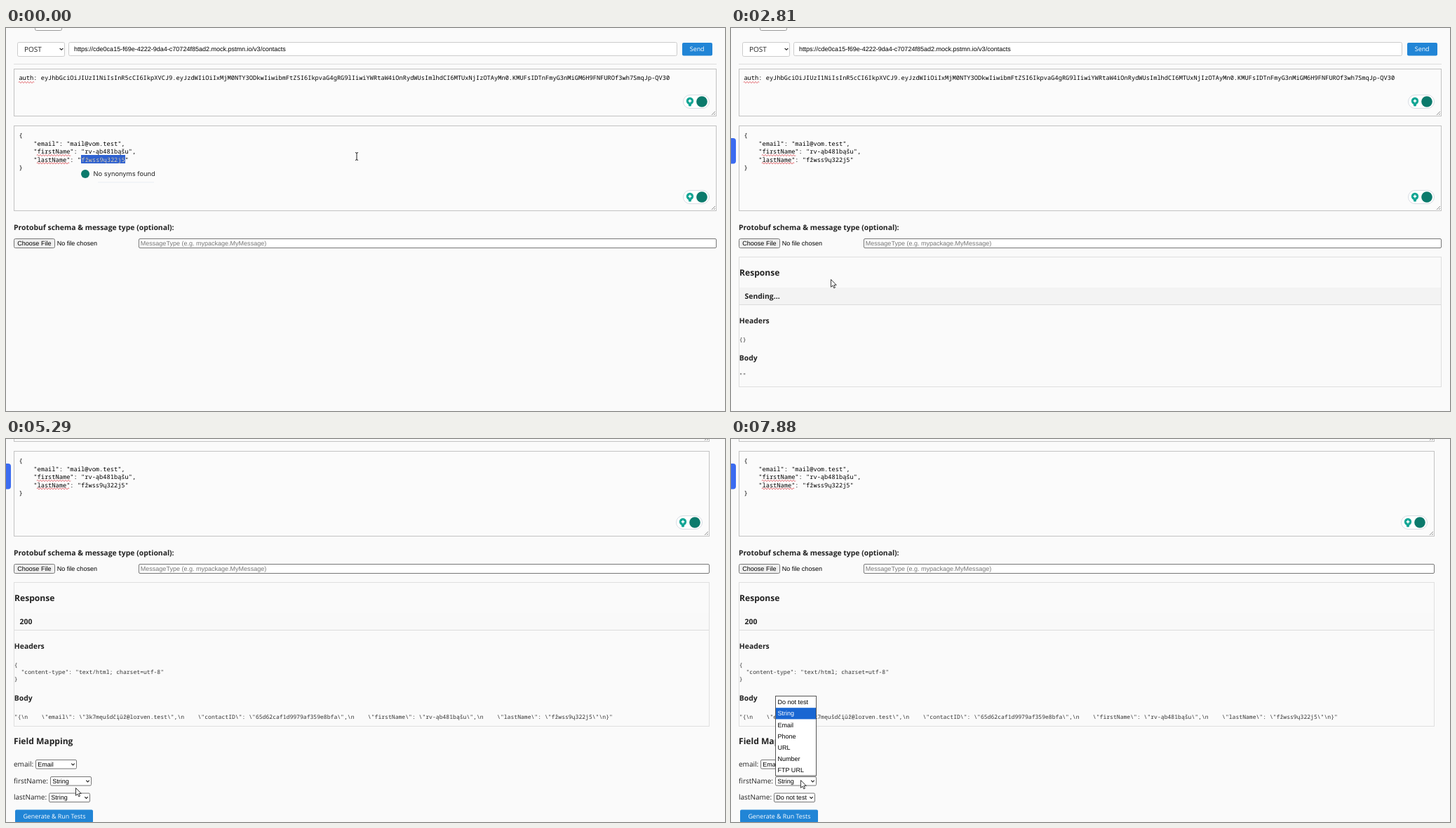
An HTML page for the animation above (8 s loop, 1025 by 546 pixels).

```html
<!DOCTYPE html>
<html lang="en">
<head>
<meta charset="utf-8">
<title>Request tester</title>
<style>
html, body { margin: 0; width: 100%; height: 100%; overflow: hidden; background: #fafafa; }
svg { display: block; width: 1025px; height: 546px; }
text { white-space: pre; text-rendering: geometricPrecision; fill: #222; }
.ui { font: 10px "Open Sans", "Noto Sans", sans-serif; }
.bold { font: bold 10.4px "Open Sans", "Noto Sans", sans-serif; }
.title { font: bold 12.1px "Open Sans", "Noto Sans", sans-serif; }
.button { font: 8.9px "Open Sans", "Noto Sans", sans-serif; fill: #fff; }
.form { font: 9.03px "Liberation Sans", Arial, sans-serif; fill: #000; }
.hint { font: 9.03px "Liberation Sans", Arial, sans-serif; fill: #757575; }
.code { font: 8.703px "Noto Sans Mono", "DejaVu Sans Mono", monospace; fill: #000; }
.pre { font: 8.087px "Noto Sans Mono", "DejaVu Sans Mono", monospace; fill: #333; }
.tip { font: 9.3px Inter, sans-serif; }
</style>
</head>
<body>
<svg id="stage" viewBox="0 0 1025 546" xmlns="http://www.w3.org/2000/svg"></svg>
<script>
const LOOP = 8000;
const stage = document.getElementById('stage');

const URL_TEXT = 'https://cde0ca15-f69e-4222-9da4-c70724f85ad2.mock.pstmn.io/v3/contacts';
const AUTH = 'auth: eyJhbGciOiJIUzI1NiIsInR5cCI6IkpXVCJ9' +
  '.eyJzdWIiOiIxMjM0NTY3ODkwIiwibmFtZSI6IkpvaG4gRG9lIiwiYWRtaW4iOnRydWUsImlhdCI6MTUxNjIzOTAyMn0' +
  '.KMUFsIDTnFmyG3nMiGM6H9FNFUROf3wh7SmqJp-QV30';
const REQUEST = ['{', '    "email": "mail@vom.test",', '    "firstName": "rv-ąb481bąšu",',
  '    "lastName": "fžwss9ų322j5"', '}'];
const HEADERS = ['{', '  "content-type": "text/html; charset=utf-8"', '}'];
const REPLY = String.raw`"{\n    \"email\": \"3k7męušdčįūž@lorven.test\",\n    \"contactID\": \"65d62caf1d9979af359e8bfa\",\n    \"firstName\": \"rv-ąb481bąšu\",\n    \"lastName\": \"fžwss9ų322j5\"\n}"`;
const OPTIONS = ['Do not test', 'String', 'Email', 'Phone', 'URL', 'Number', 'FTP URL'];

// [time, shape, x, y]
const POINTER = [
  [0, 'beam', 500, 183], [590, 'beam', 530, 192], [740, 'beam', 590, 190],
  [890, 'beam', 670, 160], [1040, 'beam', 760, 90], [1160, 'arrow', 866, 6],
  [1310, 'hand', 984, 35], [2040, 'beam', 800, 72], [2190, 'beam', 568, 160],
  [2350, 'beam', 347, 225], [2510, 'arrow', 175, 302], [2810, 'arrow', 142, 358],
  [3710, 'arrow', 138, 389], [4600, 'arrow', 139, 409], [4750, 'arrow', 137, 424],
  [4880, 'arrow', 134, 450], [5030, 'arrow', 130, 482], [5160, 'arrow', 112, 500],
  [5290, 'arrow', 99, 497], [5440, 'arrow', 94, 504], [5590, 'arrow', 92, 506],
  [6160, 'arrow', 96, 492], [6310, 'arrow', 97, 462], [6450, 'arrow', 98, 430],
  [6580, 'arrow', 98, 403], [6730, 'arrow', 98, 398], [6850, 'beam', 100, 399],
  [7000, 'beam', 102, 400], [7150, 'beam', 102, 402], [7300, 'arrow', 100, 420],
  [7450, 'arrow', 98, 448], [7590, 'arrow', 98, 472], [7730, 'arrow', 99, 486]
];
// [time, select, highlighted row]
const MENU = [[0], [5740, 'last', 1], [6160, 'last', 6], [6310, 'last', 4],
  [6450, 'last', 2], [6580, 'last', 0], [6850], [7880, 'first', 1]];
const SCROLL = [[0, 0], [3710, 110], [3860, 122]];
const TIP = [[0, 1], [150, .45], [300, 0]];
const SELECTS = {
  email: { x: 42, y: 579, label: 'email:' },
  first: { x: 63, y: 603, label: 'firstName:' },
  last: { x: 61, y: 626.5, label: 'lastName:' }
};

const at = (table, t) => table.filter(row => row[0] <= t).pop();
const esc = s => s.replace(/&/g, '&amp;').replace(/</g, '&lt;');
const text = (cls, x, y, s) => `<text class="${cls}" x="${x}" y="${y}">${esc(s)}</text>`;
const lines = (cls, x, y, step, rows) => rows.map((s, i) => text(cls, x, y + i * step, s)).join('');
const path = (d, stroke, width = 1, fill = 'none') =>
  `<path d="${d}" stroke="${stroke}" stroke-width="${width}" fill="${fill}"/>`;
const fillRect = (x, y, w, h, fill, r = 0) =>
  `<rect x="${x}" y="${y}" width="${w}" height="${h}" rx="${r}" fill="${fill}"/>`;
const dot = (x, y, r, fill) => `<circle cx="${x}" cy="${y}" r="${r}" fill="${fill}"/>`;

// Outlined box given by its outer edges
function box(left, top, right, bottom, stroke, fill = 'none', r = 0) {
  return `<rect x="${left + .5}" y="${top + .5}" width="${right - left - 1}" height="${bottom - top - 1}"
    rx="${r}" stroke="${stroke}" fill="${fill}"/>`;
}
const wave = (x, y, w) =>
  path(`M${x} ${y}q1 -2.2 2 0${'t2 0'.repeat(Math.round(w / 2) - 1)}`, '#d9363e', .8);
const chevron = (x, y, s = 2.4) => path(`M${x - s} ${y - s / 2}l${s} ${s} ${s} ${-s}`, '#222', 1.2);

function helper(right, y) {
  const x = right - 38;
  return `<rect x="${x - 9.5}" y="${y - 9.5}" width="37" height="19" rx="9.5" fill="#fff" stroke="#d8dce3"/>` +
    dot(x, y - 1, 5.2, '#12a594') + fillRect(x - 2, y + 3, 4, 3.6, '#12a594', 1) +
    path(`M${x} ${y - 4}l1 2 2 1 -2 1 -1 2 -1 -2 -2 -1 2 -1z`, 'none', 0, '#fff') +
    dot(x + 17, y, 7.8, '#0b7a6c');
}

function area(right, top, bottom) {
  return box(11, top, right, bottom, '#c2c2c2', '#fbfbfb') +
    path(`M${right - 7} ${bottom - 2}l5 -5M${right - 4} ${bottom - 2}l2 -2`, '#777', .8);
}

function requestPart(s) {
  const r = s.right;
  let out = box(41, -12, 80, 4, '#999', '#fff', 2) +
    box(16, 20, 84, 41, '#ccc', '#fff', 2) + text('ui', 26, 33.7, 'POST') + chevron(79, 30) +
    box(89, 20, r - 56, 40, '#ccc', '#fff', 2) + text('form', 97, 33.2, URL_TEXT) +
    fillRect(r - 49, 21, 43, 18.5, s.hover ? '#1a73c1' : '#2185d6', 2) +
    text('button', r - 38.2, 33.3, 'Send') +
    fillRect(11, 51, r - 11, 1, '#dedede') +
    area(r, 58, 126) + area(r, 139, 261) +
    text('code', 18.4, 74, AUTH) + wave(18, 77.5, 22);
  if (s.selected) out += fillRect(107, 181, 63, 12, '#2f62d2');
  out += lines('code', 18.4, 156, 11.5, REQUEST) + wave(44, 181.5, 48) + wave(44, 192.8, 46);
  if (s.selected) out += `<text class="code" x="107.2" y="190.5" style="fill:#e4ecff">fžwss9ų322j5</text>`;
  out += helper(s.helperRight, 105) + helper(s.helperRight, 241);
  if (s.tip) out += `<g opacity="${s.tip}">${dot(113, 208, 6, '#0b7a6c')}${text('tip', 124.6, 211.2, 'No synonyms found')}</g>`;
  if (!s.tab) out += fillRect(131, 219.5, 80, 1, '#eaeef3');
  else out += fillRect(-6, 157, 13, 36.5, '#3b6bf0', 4);
  return out + text('bold', 11, 287.7, 'Protobuf schema & message type (optional):') +
    box(11, 300, 70, 314, '#767676', '#efefef', 2) + text('form', 16.3, 310.2, 'Choose File') +
    text('form', 72.8, 310.2, 'No file chosen') +
    box(189, 300, r, 314, '#767676', '#fff', 1.5) +
    text('hint', 191.8, 310.2, 'MessageType (e.g. mypackage.MyMessage)');
}

function responsePart(s) {
  const r = s.right, done = s.phase === 2;
  return box(11, 326, r, done ? 532 : 512, '#dfdfdf') +
    text('title', 12, 353.3, 'Response') +
    fillRect(12, 370, r - 13, 24, done ? '#f9f9f9' : '#f3f3f3') + fillRect(12, 394, r - 13, 1, '#dcdcdc') +
    text('bold', 19.6, 386, done ? '200' : 'Sending...') +
    text('bold', 11.8, 421.3, 'Headers') +
    lines('pre', 11.8, 446.8, 10.2, done ? HEADERS : ['{}']) +
    text('bold', 11.8, done ? 494.6 : 474, 'Body') +
    text('pre', 11.8, done ? 520.6 : 498.4, done ? REPLY : '""');
}

function picker(key, value, focused) {
  const { x, y, label } = SELECTS[key];
  const frame = focused
    ? `<rect x="${x + .5}" y="${y}" width="58" height="13" rx="2" fill="#fff" stroke="#000" stroke-width="1.8"/>`
    : box(x, y, x + 59, y + 13.5, '#767676', '#fff', 1.5);
  return text('ui', 11, y + 9.8, label) + frame +
    text('form', x + 3.3, y + 9.9, value) + chevron(x + 53.5, y + 6.8, 2.2);
}

function menuPart([, key, active]) {
  if (!key) return '';
  const { x, y } = SELECTS[key], top = y - 115;
  return box(x, top, x + 59, y - .5, '#555', '#fff') +
    fillRect(x + 1, top + 1 + active * 16.2, 57, 16.2, '#1966d2') +
    OPTIONS.map((s, i) => `<text class="form" x="${x + 3.5}" y="${top + 12.2 + i * 16.2}"
      ${i === active ? 'style="fill:#fff"' : ''}>${s}</text>`).join('');
}

function mappingPart(s) {
  return text('title', 11, 557.3, 'Field Mapping') +
    picker('email', 'Email') + picker('first', 'String') +
    picker('last', s.skipLast ? 'Do not test' : 'String', s.focusLast) +
    fillRect(13, 650.5, 111, 18.5, '#2185d6', 2) +
    text('button', 24.4, 662.6, 'Generate & Run Tests') + menuPart(s.menu);
}

function pointer([, shape, x, y]) {
  const shapes = {
    arrow: path('M.5 .5V11.3L3 9.1 4.8 12.8 6.5 12 4.8 8.4H8.2Z', '#222', .9, '#fff'),
    beam: path('M-2 -5.5Q0 -5.5 0 -4V4Q0 5.5 -2 5.5M2 -5.5Q0 -5.5 0 -4M2 5.5Q0 5.5 0 4', '#222'),
    hand: path('M-1 1.3Q0 -.4 1.2 1.2V5.4L5.4 6.4Q7 6.8 7 8.4L6 13.4H-.6L-4.4 8.6Q-4.6 6.8 -2.8 7.4L-1 8.8Z',
      '#222', .9, '#fff')
  };
  return `<g transform="translate(${x} ${y})">${shapes[shape]}</g>`;
}

function stateAt(t) {
  return {
    right: t < 2960 ? 1013 : 1003,
    helperRight: t < 3390 ? 1013 : 1003,
    phase: t < 1460 ? 0 : t < 2960 ? 1 : 2,
    hover: t >= 1310 && t < 2040,
    selected: t < 150,
    tip: at(TIP, t)[1],
    tab: t >= 590,
    scroll: at(SCROLL, t)[1],
    skipLast: t >= 6850,
    focusLast: t >= 6850 && t < 7730,
    menu: at(MENU, t),
    pointer: at(POINTER, t)
  };
}

let shown = '';
function draw() {
  const s = stateAt(performance.now() % LOOP);
  const key = JSON.stringify(s);
  if (key !== shown) {
    shown = key;
    stage.innerHTML = fillRect(0, 0, 1025, 546, '#fafafa') +
      `<g transform="translate(0 ${-s.scroll})">` + requestPart(s) +
      (s.phase ? responsePart(s) : '') + (s.phase === 2 ? mappingPart(s) : '') +
      '</g>' + pointer(s.pointer);
  }
  requestAnimationFrame(draw);
}
draw();
</script>
</body>
</html>
```
